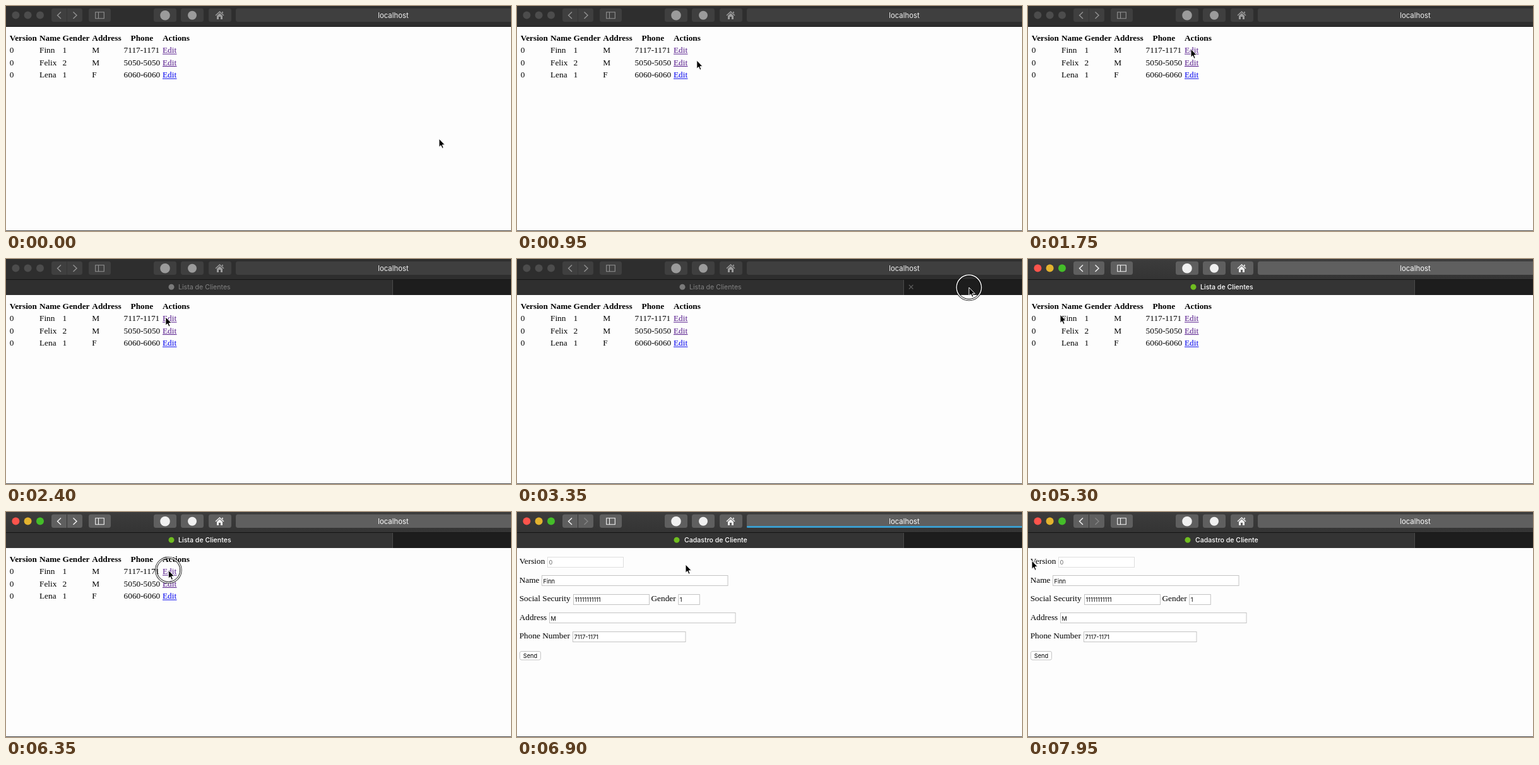
These frames come from a looping animation (800x356 px, 8000 ms). An HTML page:

```html
<!DOCTYPE html>
<html lang="en">
<head>
<meta charset="utf-8">
<title>Client list</title>
<style>
html, body { margin: 0; width: 100%; height: 100%; overflow: hidden; background: #fdfdfd; }
svg { display: block; width: 100vw; height: 100vh; }
svg {
  --btn: #3f3f3f; --ink: #929292; --mark: #9b9b9b; --host: #f2f2f2;
  --front: #2f2f2f; --rear: #1d1d1d; --red: #4c4c4c; --yellow: #4c4c4c; --green: #4c4c4c;
}
svg.on {
  --btn: #5f5f5f; --ink: #f4f4f4; --mark: #f0f0f0; --host: #fff;
  --front: #343434; --rear: #1d1d1d; --red: #fd544c; --yellow: #e3b32f; --green: #44bd29;
}
.btn { fill: var(--btn); }
.line { fill: none; stroke: var(--ink); stroke-width: 1.4; }
.mark { fill: var(--mark); }
.ui { font-family: Inter, Roboto, sans-serif; }
.page { font: 13.3px "Liberation Serif", serif; fill: #000; }
.head { font-weight: bold; }
.field { font: 9.2px Inter, Roboto, sans-serif; }
.box { fill: #fff; stroke: #c4c4c4; stroke-width: 1; }
</style>
</head>
<body>
<svg id="stage" viewBox="0 0 800 356" preserveAspectRatio="none">
  <defs>
    <linearGradient id="bar" x2="0" y2="1">
      <stop stop-color="#3c3c3c"/><stop offset="1" stop-color="#343434"/>
    </linearGradient>
  </defs>
  <rect width="800" height="356" fill="#fdfdfd"/>
  <g id="list" class="page"></g>
  <g id="form" class="page"></g>
  <path d="M0 355.5H800" stroke="#4a4a4a"/>

  <g id="tabs" class="ui" font-size="10.6">
    <rect id="tab1" y="32" width="612" height="25"/>
    <rect id="tab2" x="612" y="32" width="188" height="25"/>
    <path d="M612.5 33V57" stroke="#4b4b4b"/>
    <circle id="icon" cy="44.3" r="4.5"/>
    <text id="title" y="48.2"></text>
    <path id="close1" d="M5.5 41l6.5 6.5m0-6.5l-6.5 6.5" stroke="#929292" stroke-width="1.1"/>
    <path id="close2" d="M621 41l6.5 6.5m0-6.5l-6.5 6.5" stroke="#5e5e5e" stroke-width="1.1"/>
  </g>

  <rect id="top" width="800" height="32"/>
  <path d="M0 32.5H800" stroke="#151515"/>
  <circle cx="15.4" cy="14.6" r="6" fill="var(--red)"/>
  <circle cx="34.6" cy="14.6" r="6" fill="var(--yellow)"/>
  <circle cx="54" cy="14.6" r="6" fill="var(--green)"/>
  <g id="buttons"></g>
  <path d="M96.5 4V25" stroke="#353535"/>
  <path id="back" class="line" d="M87 9.5l-5.5 5.2l5.5 5.2"/>
  <path id="next" class="line" d="M106.5 9.5l5.5 5.2l-5.5 5.2"/>
  <path class="line" stroke-width="1" d="M141.7 9.7h13.6v10h-13.6zM146.5 9.7v10" style="stroke-width:1.1"/>
  <circle class="mark" cx="252" cy="14.7" r="7.8"/>
  <circle class="mark" cx="295" cy="14.7" r="7"/>
  <path class="mark" d="M338.500 8l7 6.500-1 1-6-5.500-6 5.500-1-1zM334 15.500l4.500-4.200 4.500 4.200V21h-3v-4h-3v4h-3zM342 9h1.800v3l-1.800-1.500z"/>
  <rect id="load" x="364" y="22.300" height="2.500" rx="1" fill="#35a7e0"/>
  <text class="ui" x="613.500" y="19" font-size="11.400" text-anchor="middle" fill="var(--host)">localhost</text>

  <g id="cursor">
    <g id="ring" fill="none">
      <circle r="20.700" stroke="#111" stroke-width="1.200"/>
      <circle r="19.600" stroke="#f4f4f4" stroke-width="1.600"/>
      <circle r="18.400" stroke="#111" stroke-width="1"/>
    </g>
    <path d="M0 0V13.300L3 10.600L5 15.300L7.200 14.400L5.200 9.800H9.400Z" stroke="#fff" stroke-width="1"/>
  </g>
</svg>
<script>
const NS = "http://www.w3.org/2000/svg";
const LOOP = 8000;
const $ = id => document.getElementById(id);

function add(parent, tag, attrs, text) {
  const el = document.createElementNS(NS, tag);
  for (const k in attrs) el.setAttribute(k, attrs[k]);
  if (text) el.textContent = text;
  parent.append(el);
  return el;
}
const show = (id, on) => { $(id).style.display = on ? "" : "none"; };
const set = (id, k, v) => $(id).setAttribute(k, v);

// Toolbar buttons: x, width
for (const [x, width] of [[72, 49], [131, 35], [234, 36], [277, 36], [321, 36], [364, 450]])
  add($("buttons"), "rect", { class: "btn", x, y: 3.8, width, height: 21.2, rx: 3.5 });

// Client table
const cols = [5.8, 53, 89.6, 136.3, 186.6, 248];
const heads = ["Version", "Name", "Gender", "Address", "Phone", "Actions"];
const rows = [
  ["0", "Finn", "1", "M", "7117-1171", "Edit"],
  ["0", "Felix", "2", "M", "5050-5050", "Edit"],
  ["0", "Lena", "1", "F", "6060-6060", "Edit"]
];
heads.forEach((h, i) =>
  add($("list"), "text", { class: "head", x: i === 4 ? 197.6 : cols[i], y: 54.5 }, h));
rows.forEach((row, r) => row.forEach((cell, i) => {
  const y = 74.2 + r * 19.5;
  const fill = i < 5 ? "#000" : r < 2 ? "#551a8b" : "#0000ee";
  add($("list"), "text", { x: cols[i], y, fill }, cell);
  if (i === 5) add($("list"), "rect", { x: 248, y: y + 1.3, width: 22.5, height: 1, fill });
}));

// Form: label, label x, box x, box width, line, value
const fields = [
  ["Version", 3.7, 48.5, 120, 0, "0"],
  ["Name", 3.7, 39.5, 294.5, 1, "Finn"],
  ["Social Security", 3.7, 89.5, 120, 2, "11111111111"],
  ["Gender", 212.5, 255.8, 33.5, 2, "1"],
  ["Address", 3.7, 51.5, 294.5, 3, "M"],
  ["Phone Number", 3.7, 88.5, 178.5, 4, "7117-1171"]
];
for (const [label, lx, x, width, n, value] of fields) {
  const y = 82.3 + n * 29.5, f = $("form");
  add(f, "text", { x: lx, y }, label);
  add(f, "rect", { class: "box", x, y: Math.round(y - 11.8) + 0.5, width, height: 16,
    style: n ? "" : "stroke:#dedede" });
  add(f, "text", { class: "field", x: x + 2, y: y + 0.7, fill: n ? "#000" : "#666" }, value);
}
add($("form"), "rect", { class: "box", x: 4.5, y: 220.5, width: 33, height: 13.5, rx: 2.5 });
add($("form"), "text", { class: "field", x: 9.8, y: 230.5 }, "Send");

// Pointer path: time, x, y
const path = [
  [0, 686, 210], [550, 686, 210], [1150, 146, 43], [1350, 180, 50], [1650, 258, 68],
  [2250, 258, 68], [2450, 252, 96], [3050, 700, 46], [3250, 716, 45], [3700, 716, 45],
  [4300, 470, 43], [4600, 455, 43], [5150, 70, 84], [5300, 51, 88], [5550, 10, 98],
  [5700, 20, 100], [6200, 257, 92], [6600, 258, 92], [6900, 267, 83], [7350, 245, 85],
  [7800, 6, 77], [LOOP, 6, 77]
];
const clicks = [[1850, 2050], [3250, 3450], [4400, 4550], [6300, 6450]];
const ease = k => k * k * (3 - 2 * k);
const clamp = k => Math.max(0, Math.min(1, k));

function pointer(t) {
  const i = path.findIndex(p => p[0] > t);
  const [a, ax, ay] = path[i - 1], [b, bx, by] = path[i];
  const k = ease((t - a) / (b - a));
  return [ax + (bx - ax) * k, ay + (by - ay) * k];
}

function render(t) {
  const [x, y] = pointer(t);
  const drop = 24 * ease(clamp((t - 2000) / 150));
  const active = t >= 3400;
  const second = t >= 3450 && t < 4500;
  const edited = t >= 6550;
  const over = drop === 24 && y > 33 && y < 57;

  $("stage").classList.toggle("on", active);
  set("top", "fill", active ? "url(#bar)" : "#2e2e2e");
  show("list", !second && !edited);
  show("form", second || edited);
  set("list", "transform", `translate(0 ${drop})`);

  show("tabs", drop > 0);
  set("tabs", "transform", `translate(0 ${drop - 24})`);
  set("tab1", "fill", second ? "var(--rear)" : "var(--front)");
  set("tab2", "fill", second ? "var(--front)" : "var(--rear)");
  show("close1", over && second && x < 612);
  show("close2", over && !second && x > 612);
  $("title").textContent = edited ? "Cadastro de Cliente" : "Lista de Clientes";
  set("title", "x", edited ? 265 : 273);
  set("title", "fill", !active ? "#828282" : second ? "#a0a0a0" : "#fff");
  set("title", "font-weight", active && !second ? 500 : 400);
  set("icon", "cx", edited ? 253 : 262);
  set("icon", "fill", active ? "#6fbd20" : "#7a7a7a");

  const dim = "#858585";
  $("back").style.stroke = second ? dim : "";
  $("next").style.stroke = second || t >= 6400 ? dim : "";
  show("load", t >= 6380 && t < 7150);
  set("load", "width", 436 * clamp((t - 6330) / 220));
  set("load", "opacity", 1 - clamp((t - 7000) / 150));

  set("cursor", "transform", `translate(${x.toFixed(2)} ${y.toFixed(2)})`);
  show("ring", clicks.some(([a, b]) => t >= a && t < b));
}
// The second click is held a little past the window's activation
clicks[1][1] = 3450;

const start = performance.now();
function tick() {
  render((performance.now() - start) % LOOP);
  requestAnimationFrame(tick);
}
render(0);
tick();
</script>
</body>
</html>
```
